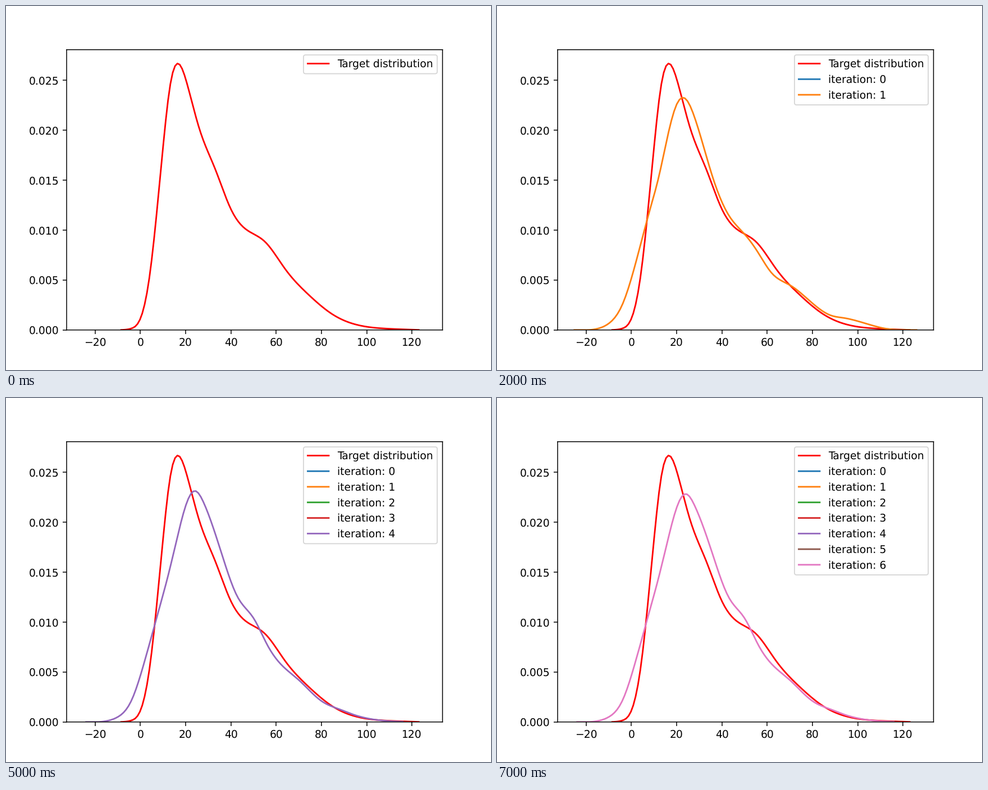
A matplotlib script for the animation above (8000 ms loop, 864 by 648 pixels).

```python
import numpy as np
import matplotlib.pyplot as plt
from matplotlib.animation import FuncAnimation

plt.rcParams.update({"path.snap": False, "text.hinting": "none"})

STEPS = 8            # the fixed curve alone, then iterations 0 to 6
SAMPLES = 128
UNIT = 1e-4

# Key points: x, density in units of 1e-4.
GOAL = [(-9, 0), (-4, 1.5), (0, 11.4), (4, 53), (10, 183), (13, 243),
        (16.6, 267), (21, 243.5), (26, 202), (33, 161.5), (40, 121),
        (46, 102), (55, 88.5), (64, 61), (74, 36), (85, 15.5), (96, 5),
        (110, 1.2), (124, 0)]

# Key points: x, density early on, density once settled.
ESTIMATE = [(-26, 0, 0), (-16, .8, .6), (-10, 6.5, 5), (-4, 25.4, 21.3),
            (2, 68, 62), (8, 119, 111), (12, 152.5, 144.5), (16, 194, 182),
            (20, 226, 216.5), (24, 231.5, 231.5), (28, 212.5, 219.5),
            (36, 152.5, 168), (43, 115, 125), (50, 96, 104), (56, 77.5, 77.5),
            (62, 57, 58), (70, 45, 42), (80, 26.8, 21), (88, 14.7, 12.7),
            (94, 12, 7.5), (112, 1.5, .6), (126, 0, 0)]


def spline(kx, ky, x):
    """Natural cubic spline through the key points, never below zero."""
    n = len(kx)
    h = np.diff(kx)
    slope = np.diff(ky) / h
    a, b = np.eye(n), np.zeros(n)
    for i in range(1, n - 1):
        a[i, i - 1:i + 2] = h[i - 1], 2 * (h[i - 1] + h[i]), h[i]
        b[i] = 6 * (slope[i] - slope[i - 1])
    m = np.linalg.solve(a, b)
    i = np.clip(np.searchsorted(kx, x) - 1, 0, n - 2)
    l, r = kx[i + 1] - x, x - kx[i]
    y = (m[i] * l**3 + m[i + 1] * r**3) / (6 * h[i])
    y += (ky[i] / h[i] - m[i] * h[i] / 6) * l
    y += (ky[i + 1] / h[i] - m[i + 1] * h[i] / 6) * r
    return np.maximum(y, 0)


def goal():
    kx, ky = np.array(GOAL, float).T
    x = np.linspace(-8.5, 123, SAMPLES)
    return x, spline(kx, ky, x) * UNIT


def estimate(k):
    """Curve of iteration k; its crest sinks step by step once settled."""
    kx, early, settled = np.array(ESTIMATE, float).T
    if k < 2:
        x = np.linspace(-25.2, 126, SAMPLES)
        return x, spline(kx, early, x) * UNIT
    x = np.linspace(-24, 116, SAMPLES)
    lift = 14 * 0.6 ** (k - 2) - 5
    crest = lift * np.exp(-((x - 26) / 8) ** 2)
    return x, (spline(kx, settled, x) + crest) * UNIT


fig, ax = plt.subplots(figsize=(6.4, 4.8), dpi=135)
ax.set_xlim(-32.6, 133.5)
ax.set_ylim(0, 0.02808)

goal_line, = ax.plot(*goal(), color="red", label="Target distribution")
lines = [ax.plot(*estimate(k), color=f"C{k}", label=f"iteration: {k}")[0]
         for k in range(STEPS - 1)]


def draw(step):
    for k, line in enumerate(lines):
        line.set_visible(k == step - 1)
    legend = ax.legend(handles=[goal_line] + lines[:step], loc="upper right")
    for handle in legend.get_lines():
        handle.set_visible(True)
    return [goal_line, *lines, legend]


anim = FuncAnimation(fig, draw, frames=STEPS, interval=1000,
                     init_func=lambda: draw(0), repeat=True, repeat_delay=0)
plt.show()
```
